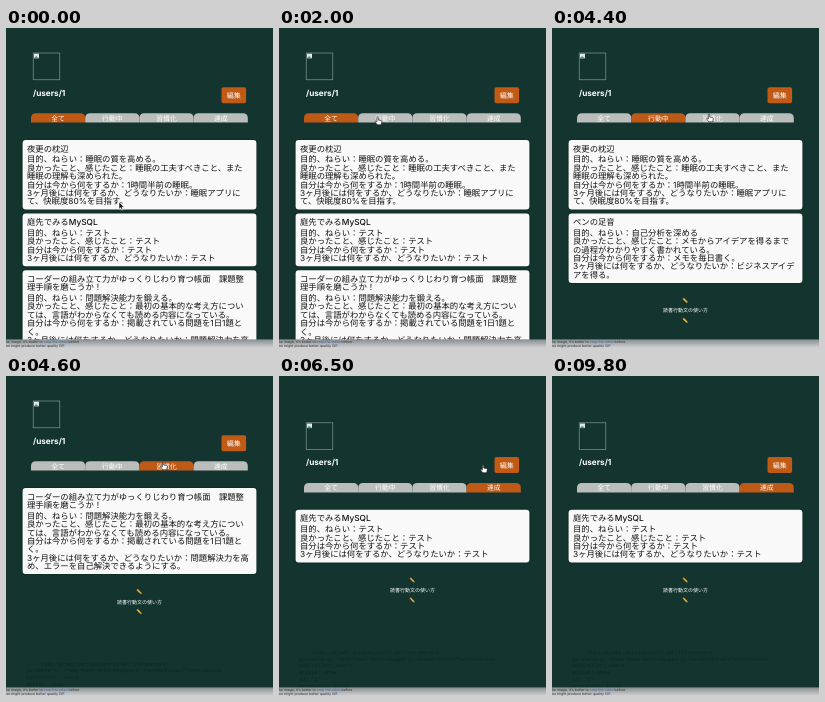
An HTML page for the animation above (9900 ms loop, 267 by 320 pixels).

```html
<!DOCTYPE html>
<html lang="ja">
<head>
<meta charset="utf-8">
<title>読書行動文</title>
<style>
  html, body { margin: 0; width: 100%; height: 100%; overflow: hidden; background: #14352f; }
  svg { display: block; width: 100vw; height: 100vh; }
  text { font-family: Inter, "Noto Sans CJK JP", "Noto Sans CJK", sans-serif; text-rendering: geometricPrecision; white-space: pre; }
  .debug { font-family: "Liberation Mono", monospace; }
  .card { filter: drop-shadow(0 .4px .8px rgba(0, 0, 0, .35)); }
</style>
</head>
<body>
<svg id="stage" viewBox="0 0 267 320"></svg>
<script>
const LOOP = 9900;
const LINE = 8.35;
const GAP = 4.1;
const TABS = ['全て', '行動中', '習慣化', '達成'];
const GOAL = '目的、ねらい：';
const GOOD = '良かったこと、感じたこと：';
const NOW = '自分は今から何をするか：';
const LATER = '3ヶ月後には何をするか、どうなりたいか：';

const sleep = {
  title: ['夜更の枕辺'],
  body: [GOAL + '睡眠の質を高める。', GOOD + '睡眠の工夫すべきこと、また', '睡眠の理解も深められた。',
    NOW + '1時間半前の睡眠。', LATER + '睡眠アプリに', 'て、快眠度80%を目指す。']
};
const database = {
  title: ['庭先でみるMySQL'],
  body: [GOAL + 'テスト', GOOD + 'テスト', NOW + 'テスト', LATER + 'テスト']
};
const coder = {
  title: ['コーダーの組み立て力がゆっくりじわり育つ帳面　課題整', '理手順を磨こうか！'],
  body: [GOAL + '問題解決能力を鍛える。', GOOD + '最初の基本的な考え方につい', 'ては、言語がわからなくても読める内容になっている。',
    NOW + '掲載されている問題を1日1題と', 'く。', LATER + '問題解決力を高', 'め、エラーを自己解決できるようにする。']
};
const pen = {
  title: ['ペンの足音'],
  body: [GOAL + '自己分析を深める', GOOD + 'メモからアイデアを得るまで', 'の過程がわかりやすく書かれている。',
    NOW + 'メモを毎日書く。', LATER + 'ビジネスアイデ', 'アを得る。']
};
const DEBUG = ['--- !ruby/object:ActionController::Parameters',
  'parameters: !ruby/hash:ActiveSupport::HashWithIndifferentAccess',
  'controller: users', 'action: show', "id: '1'", 'permitted: false'];

// Each view: start time, active tab, vertical page offset, cards
const VIEWS = [
  { at: 0, tab: 0, dy: 0, cards: [sleep, database, coder] },
  { at: 2200, tab: 1, dy: 0, cards: [sleep, pen] },
  { at: 4600, tab: 2, dy: 0, cards: [coder] },
  { at: 6300, tab: 3, dy: 21.8, cards: [database] }
];

// Pointer stops: time, x, y, shape on the way to the next stop
const STOPS = [
  [0, 113, 174, 'arrow'], [400, 113, 174, 'arrow'], [1500, 99.5, 93, 'hand'],
  [2600, 99.5, 93, 'hand'], [3000, 100, 181.6, 'hand'], [3300, 100, 181.6, 'hand'],
  [4100, 158, 90, 'hand'], [4950, 158, 90, 'hand'], [5600, 194, 93, 'hand'],
  [6000, 205, 93, 'hand'], [6900, 205, 93, 'hand'], [7500, 142, 157, 'hand'],
  [7900, 142, 157, 'hand'], [8900, 150, -12, 'arrow'], [LOOP, 150, -12, 'arrow']
];

const label = (str, x, cy, size, attrs = '') =>
  `<text x="${x}" y="${cy + size * 0.37}" font-size="${size}" ${attrs}>${str}</text>`;
const rect = (x, y, w, h, fill, r = 0, attrs = '') =>
  `<rect x="${x}" y="${y}" width="${w}" height="${h}" rx="${r}" fill="${fill}" ${attrs}/>`;

function drawHeader(active) {
  const centered = 'fill="#fff" text-anchor="middle"';
  const tabs = TABS.map((name, i) => {
    const x = 25 + i * 54.2;
    const color = i === active ? '#bf5916' : '#bbbdbc';
    return `<path d="M${x} 94.6V90q0-4.8 5-4.8h44.2q5 0 5 4.8v4.6z" fill="${color}"/>` +
      label(name, x + 27.1, 90, 6.8, centered);
  }).join('');
  return rect(27.2, 25, 26.6, 26.8, 'none', 0, 'stroke="#93a5a0" stroke-width=".6"') +
    rect(28, 25.7, 5, 4.6, '#dfe8ee') + '<path d="M28 30.3l2-2.4 3 2.4z" fill="#5d9a68"/>' +
    label('/users/1', 27, 64.6, 8.2, 'fill="#fff" font-weight="700"') +
    rect(215.5, 59.3, 24.6, 16, '#c05a15', 2) + label('編集', 227.8, 67.4, 7, centered) + tabs;
}

function cardHeight({ title, body }) {
  return 19.3 + (title.length - 1 + body.length) * LINE;
}

function drawCard(card, y) {
  const { title, body } = card;
  const bodyTop = y + 19.4 + (title.length - 1) * LINE;
  return rect(16.6, y, 233.8, cardHeight(card), '#f9f9f9', 3, 'class="card"') +
    title.map((s, i) => label(s, 21, y + 8.5 + i * LINE, 8.35, 'fill="#111" font-weight="500"')).join('') +
    body.map((s, i) => label(s, 21, bodyTop + i * LINE, 8.35, 'fill="#111"')).join('');
}

const pencil = y => `<g transform="translate(133.3 ${y}) rotate(45)">` +
  rect(-2.6, -0.8, 4.5, 1.6, '#f3b32c') + rect(-3.2, -0.8, 0.9, 1.6, '#df7469') +
  '<path d="M1.9-.8L3.3 0 1.9.8z" fill="#e9d0a0"/></g>';

function drawView({ tab, dy, cards }) {
  let y = 112;
  let out = drawHeader(tab);
  for (const card of cards) {
    out += drawCard(card, y);
    y += cardHeight(card) + GAP;
  }
  const foot = y - GAP + 17.6;
  out += pencil(foot) + pencil(foot + 20) +
    label('読書行動文の使い方', 133.5, foot + 10, 5, 'fill="#fff" text-anchor="middle"') +
    DEBUG.map((s, i) => label(s, 20, foot + 72 + i * 6.7, 5.2, 'class="debug" fill="#0c2722"')).join('');
  return `<g class="view" transform="translate(0 ${dy})">${out}</g>`;
}

const footer = `<linearGradient id="shade" x2="0" y2="1">
    <stop stop-color="#868d8e"/><stop offset="1" stop-color="#d2d2d7"/></linearGradient>` +
  rect(0, 311.4, 267, 8.6, 'url(#shade)') +
  label('ke image, it\'s better to <tspan fill="#2f62a8">crop the video</tspan> before', 0, 314, 3.5, 'fill="#333"') +
  label('eo might produce better quality GIF.', 0, 318.2, 3.5, 'fill="#333"');

const pointers = `<g id="arrow"><path d="M0 0V7.2L1.7 5.7 2.8 8.2 4 7.7 2.9 5.2H5.2z"
    fill="#111" stroke="#fff" stroke-width=".6"/></g>
  <g id="hand"><path d="M-1.6-3.6q.7-.8 1.3 0V-1l2.9.6q.8.3.7 1.2L2.7 3.8H-1.3L-3.3.9q-.2-.9.6-.8l1.1.8z"
    fill="#fff" stroke="#111" stroke-width=".6" stroke-linejoin="round"/></g>`;

const stage = document.getElementById('stage');
stage.innerHTML = rect(0, 0, 267, 320, '#14352f') + VIEWS.map(drawView).join('') + footer + pointers;
const views = [...stage.querySelectorAll('.view')];
const shapes = { arrow: stage.querySelector('#arrow'), hand: stage.querySelector('#hand') };

const ease = p => p * p * (3 - 2 * p);

function render(now) {
  const t = now % LOOP;
  const current = VIEWS.findLastIndex(v => t >= v.at);
  views.forEach((el, i) => { el.style.display = i === current ? '' : 'none'; });

  const i = STOPS.findLastIndex(s => t >= s[0]);
  const [t0, x0, y0, shape] = STOPS[i];
  const [t1, x1, y1] = STOPS[i + 1];
  const p = ease((t - t0) / (t1 - t0));
  for (const name in shapes) shapes[name].style.display = name === shape ? '' : 'none';
  shapes[shape].setAttribute('transform', `translate(${x0 + (x1 - x0) * p} ${y0 + (y1 - y0) * p})`);
}

const start = performance.now();
function tick() {
  render(performance.now() - start);
  requestAnimationFrame(tick);
}
tick();
</script>
</body>
</html>
```
